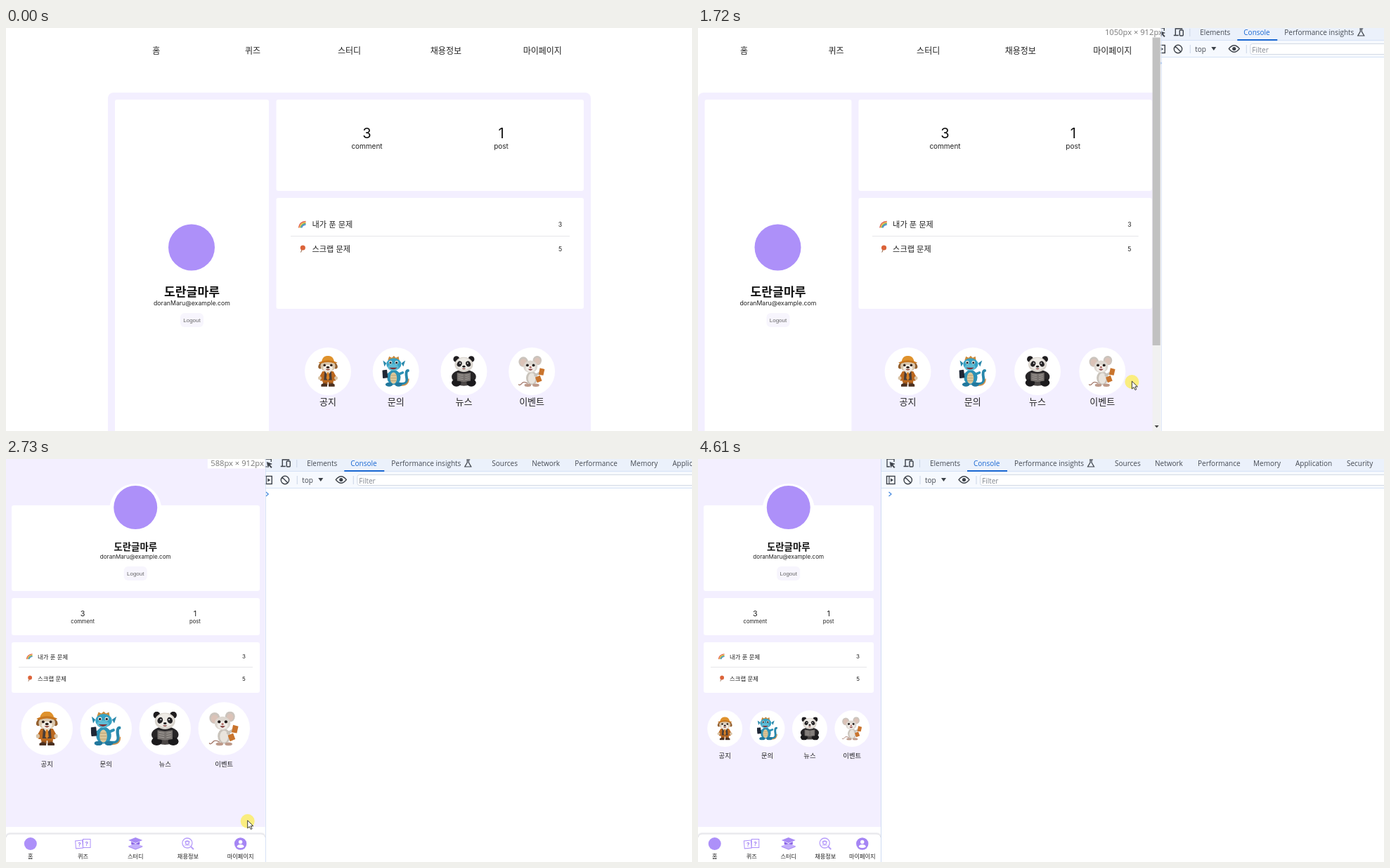
Write an HTML page that moves like this. It is 976 by 574 pixels and loops after 5.14 s.

```html
<!DOCTYPE html>
<html lang="ko">
<head>
<meta charset="utf-8">
<title>Responsive page</title>
<style>
html, body { margin: 0; width: 100%; height: 100%; overflow: hidden; background: #fff; }
svg { display: block; }
text { font-family: Inter, "Noto Sans CJK KR", "Noto Sans CJK", sans-serif; white-space: pre; }
.ui { font-family: "Open Sans", "Noto Sans", sans-serif; }
.btn { font-family: "Liberation Sans", Arial, sans-serif; }
</style>
</head>
<body>
<svg width="100%" height="100%" viewBox="0 0 976 574">
  <defs>
    <symbol id="pup" viewBox="0 0 40 46">
      <path d="M13 36h6.500v7h-7zM21 36h6.500l.5 7h-7z" fill="#9a561f"/>
      <path d="M10 42.500q5-3 9 0v3h-9zM21 42.500q5-3 9 0v3h-9z" fill="#4b3020"/>
      <path d="M12 23h16l5 9-2 5h-3v2H12v-2H9l-2-5z" fill="#bb681f"/>
      <path d="M15 23h10l1 13H14z" fill="#4a3d37"/>
      <path d="M15.500 23h9L20 29z" fill="#f1e8da"/>
      <path d="M18.700 24.500h2.600l1 9-2.300 3-2.300-3z" fill="#d98125"/>
      <ellipse cx="8" cy="33" rx="2.500" ry="2.800" fill="#d9c3a5"/>
      <ellipse cx="32" cy="33" rx="2.500" ry="2.800" fill="#d9c3a5"/>
      <ellipse cx="9" cy="15" rx="3" ry="4.500" fill="#94602f" transform="rotate(20 9 15)"/>
      <ellipse cx="31" cy="15" rx="3" ry="4.500" fill="#94602f" transform="rotate(-20 31 15)"/>
      <ellipse cx="20" cy="15.500" rx="11" ry="8.500" fill="#d9c7ae"/>
      <ellipse cx="20" cy="18.500" rx="7" ry="5" fill="#f4eee5"/>
      <path d="M10.500 9Q12 0 20 0t9.500 9z" fill="#df922c"/>
      <path d="M6 10Q20 3 34 10q-3 2-5 1-9-3-18 0-2 1-5-1z" fill="#c87720"/>
      <circle cx="15" cy="14" r="1.800" fill="#2a1c17"/><circle cx="25" cy="14" r="1.800" fill="#2a1c17"/>
      <ellipse cx="20" cy="17" rx="2.300" ry="1.600" fill="#2a1c17"/>
      <path d="M16.500 19.500q3.500 4 7 0z" fill="#8a3c31"/>
    </symbol>
    <symbol id="dragon" viewBox="0 0 40 46">
      <path d="M24 41Q38 44 36 33T38 22" fill="none" stroke="#2887aa" stroke-width="4" stroke-linecap="round"/>
      <path d="M28 44q11 0 11-10" fill="none" stroke="#d2904a" stroke-width="1.500"/>
      <path d="M8 7l2-6 4 2 3-3 3 3 4-2 1 6z" fill="#c98a3c"/>
      <ellipse cx="17" cy="32" rx="10" ry="11" fill="#2c91b5"/>
      <ellipse cx="16.500" cy="33" rx="5" ry="8.500" fill="#dcc79b"/>
      <path d="M12 29h9M12 33h9M12 37h9" stroke="#b99c6a" stroke-width=".8"/>
      <ellipse cx="10" cy="42.500" rx="5.500" ry="3" fill="#22789d"/>
      <ellipse cx="24" cy="42.500" rx="5.500" ry="3" fill="#22789d"/>
      <path d="M6 11l-5-4 2 9zM28 11l6-4-3 9z" fill="#2887aa"/>
      <ellipse cx="17" cy="12.500" rx="11" ry="9" fill="#37a2c4"/>
      <ellipse cx="16" cy="17" rx="8" ry="5" fill="#5fbcd5"/>
      <circle cx="12" cy="10" r="2.500" fill="#f3f1e8"/><circle cx="21" cy="10" r="2.500" fill="#f3f1e8"/>
      <circle cx="12" cy="10.300" r="1.600" fill="#1c2630"/><circle cx="21" cy="10.300" r="1.600" fill="#1c2630"/>
      <path d="M10 17.500q6 5.500 12 0z" fill="#7e3036"/>
      <path d="M10 27l-5 2M25 27l5-2" stroke="#2c91b5" stroke-width="3.800" stroke-linecap="round"/>
      <rect x="0" y="21" width="7.500" height="12" rx="1" fill="#1f2735" transform="rotate(-6 4 27)"/>
    </symbol>
    <symbol id="panda" viewBox="0 0 40 46">
      <circle cx="9" cy="5" r="4.600" fill="#1f1d1f"/><circle cx="31" cy="5" r="4.600" fill="#1f1d1f"/>
      <ellipse cx="20" cy="31" rx="18" ry="10.500" fill="#262426"/>
      <ellipse cx="20" cy="39" rx="12" ry="5.500" fill="#4b4746"/>
      <ellipse cx="9" cy="40" rx="7" ry="5.500" fill="#1b1a1c"/><ellipse cx="31" cy="40" rx="7" ry="5.500" fill="#1b1a1c"/>
      <ellipse cx="20" cy="13" rx="13.500" ry="11" fill="#d9d4cd"/>
      <ellipse cx="20" cy="12" rx="11" ry="9" fill="#eeebe6"/>
      <ellipse cx="13.500" cy="12" rx="3.500" ry="4.300" fill="#252325" transform="rotate(25 13.500 12)"/>
      <ellipse cx="26.500" cy="12" rx="3.500" ry="4.300" fill="#252325" transform="rotate(-25 26.500 12)"/>
      <circle cx="14.500" cy="11" r=".9" fill="#fff"/><circle cx="25.500" cy="11" r=".9" fill="#fff"/>
      <ellipse cx="20" cy="16" rx="2.200" ry="1.500" fill="#1f1d1f"/>
      <path d="M17 18.500q3 3.500 6 0z" fill="#8d4c49"/>
      <path d="M10 25l10 1.500L30 25v12l-10 1.500L10 37z" fill="#77726f"/>
      <path d="M12 28l7 1M12 31l7 1M12 34l7 1M22 29l6-1M22 32l6-1M22 35l6-1" stroke="#aaa5a1" stroke-width=".8"/>
    </symbol>
    <symbol id="mouse" viewBox="0 0 40 46">
      <path d="M14 41Q8 37 5 41T0 42" fill="none" stroke="#a47c6e" stroke-width="1.300"/>
      <ellipse cx="7.500" cy="9" rx="7" ry="7.500" fill="#cbc4bd"/><ellipse cx="7.500" cy="10" rx="4.800" ry="5.500" fill="#dbc3b8"/>
      <ellipse cx="28" cy="7" rx="6.500" ry="7" fill="#cbc4bd"/><ellipse cx="28" cy="8" rx="4.300" ry="5" fill="#dbc3b8"/>
      <ellipse cx="20" cy="33" rx="8.500" ry="10" fill="#c9c3bb"/><ellipse cx="20" cy="33.500" rx="5.500" ry="8" fill="#e9e4dd"/>
      <ellipse cx="14" cy="43.500" rx="5" ry="2.300" fill="#bd9a8a"/><ellipse cx="26" cy="43.500" rx="5" ry="2.300" fill="#bd9a8a"/>
      <ellipse cx="18" cy="16" rx="10.500" ry="9" fill="#ddd7d0"/>
      <ellipse cx="18" cy="18.500" rx="7" ry="5.500" fill="#f0ece7"/>
      <circle cx="13.500" cy="14" r="2" fill="#211b1a"/><circle cx="22.500" cy="14" r="2" fill="#211b1a"/>
      <circle cx="18" cy="17" r="1.500" fill="#b26f68"/>
      <path d="M14.500 19.500q3.500 4.500 7 0z" fill="#7f3736"/>
      <path d="M25 29l7-4" stroke="#c9c3bb" stroke-width="3.500" stroke-linecap="round"/>
      <path d="M32 18l7 2-2 9-7-1zM25 32l7-3 3 8-7 3z" fill="#c9742d"/>
    </symbol>
    <g id="rainbow" fill="none" stroke-width="1.500">
      <path d="M-5 4.500Q-4-4 5-4.500" stroke="#dd6250"/>
      <path d="M-3.600 4.500Q-2.500-2.500 5-3" stroke="#efb33e"/>
      <path d="M-2.200 4.500Q-1-1 5-1.500" stroke="#58ac76"/>
      <path d="M-.8 4.500Q0 .5 5 0" stroke="#4b87cf"/>
    </g>
    <g id="balloon">
      <path d="M0 0L-2 5" stroke="#8a5737"/><circle cx=".8" cy="-1.500" r="3.600" fill="#db6339"/>
    </g>
    <g id="icon0"><circle r="9" fill="#ad90f9"/></g>
    <g id="icon1" fill="#fff" stroke="#ad90f9">
      <rect x="-10.500" y="-5" width="10" height="11" transform="rotate(-5)"/>
      <rect x="0" y="-6.500" width="10.500" height="12"/>
      <g fill="#9c7bf2" stroke="none" font-size="8" font-weight="700" text-anchor="middle">
        <text x="-5" y="4">?</text><text x="5.300" y="2.500">?</text>
      </g>
    </g>
    <g id="icon2" fill="#a88af5">
      <path d="M-6-3v4q6 3 12 0v-4L0 0z" fill="#8d68e6"/><path d="M0-9L10-5 0-1-10-5z"/>
      <path d="M-10 3L0 0 10 3 0 7z" fill="#c3aefb"/><path d="M-10 3L0 7 10 3v1.500L0 8.500-10 4.500z"/>
    </g>
    <g id="icon3" fill="none" stroke="#b79dfa" stroke-width="1.300">
      <circle cx="-1" cy="-1" r="7"/><path d="M4 4l4 4" stroke-width="2"/>
      <circle cx="-1" cy="-1.500" r="2.500"/><path d="M-5-3h8M-5 2h8" stroke-width=".8"/>
    </g>
    <g id="icon4">
      <circle r="8.700" fill="#a585f4"/><circle cy="-2.500" r="2.700" fill="#fff"/>
      <path d="M-5 4.500q0-3.500 5-3.500t5 3.500q-5 3-10 0z" fill="#fff"/>
    </g>
    <g id="pointer">
      <circle cy="1" r="10" fill="#ffec1a" fill-opacity=".56"/>
      <path d="M0 0v11l2.600-2.400 2 4 1.800-.9-1.900-3.800H8z" fill="#fff" stroke="#222" stroke-width=".9"/>
    </g>
  </defs>
  <g id="stage"></g>
</svg>
<script>
const LOOP = 5140, WIDTH = 976, HEIGHT = 574;
const LILAC = '#f3efff', PURPLE = '#ad90f9';
const NAME = '도란글마루', MAIL = 'doranMaru@example.com';
const MENU = ['홈', '퀴즈', '스터디', '채용정보', '마이페이지'];
const FRIENDS = [['pup', '공지'], ['dragon', '문의'], ['panda', '뉴스'], ['mouse', '이벤트']];
const TASKS = [['rainbow', '내가 푼 문제', 3], ['balloon', '스크랩 문제', 5]];

const BURSTS = [[970, 1450, 8], [1520, 1990, 8], [2060, 2530, 8], [2590, 3020, 7], [3130, 3540, 7], [4270, 4610, 5]];
// time, divider, tools offset, page width, reported px, pointer x, pointer y
const KEYS = [
  [970, 992, 992, 977, 1560, 990, 494],
  [1100, 985, 965, 962, 1530, 940, 496],
  [1450, 839, 818, 823, 1323, 773, 500],
  [1900, 540, 530, 545, 870, 515, 505],
  [2060, 479, 478, 483, 768, 470, 506],
  [2463, 420, 400, 417, 664, 384, 510],
  [3020, 314.5, 314, 317, 508, 301, 520],
  [3540, 260, 260, 257.5, 412, 262, 526],
  [4185, 260, 260, 257.5, 412, 262, 526],
  [4525, 260, 260, 257.5, 412, 445, 549]
];

function snap(t) {
  let at = 0;
  for (const [from, to, steps] of BURSTS) {
    if (t < from) break;
    const step = (to - from) / (steps - 1);
    at = Math.min(to, from + Math.floor((t - from) / step + .06) * step);
  }
  return at;
}

function pose(t) {
  const next = KEYS.findIndex(k => k[0] > t);
  if (next === 0) return KEYS[0].slice(1);
  if (next < 0) return KEYS.at(-1).slice(1);
  const a = KEYS[next - 1], b = KEYS[next], f = (t - a[0]) / (b[0] - a[0]);
  return a.slice(1).map((v, i) => v + (b[i + 1] - v) * f);
}

const rect = (x, y, w, h, fill, rx = 0, extra = '') =>
  `<rect x="${x}" y="${y}" width="${Math.max(0, w)}" height="${h}" rx="${rx}" fill="${fill}" ${extra}/>`;
const circle = (x, y, r, fill) => `<circle cx="${x}" cy="${y}" r="${r}" fill="${fill}"/>`;
const text = (x, y, str, size, fill = '#222', extra = '', anchor = 'middle') =>
  `<text x="${x}" y="${y + size * .36}" font-size="${size}" fill="${fill}" text-anchor="${anchor}" ${extra}>${str}</text>`;
const ui = (x, y, str, fill = '#454a52', size = 10, anchor = 'start') => text(x, y, str, size, fill, 'class="ui"', anchor);
const line = (d, stroke, width = 1, fill = 'none') => `<path d="${d}" stroke="${stroke}" stroke-width="${width}" fill="${fill}"/>`;
const use = (id, x, y, scale = 1) => `<use href="#${id}" transform="translate(${x} ${y}) scale(${scale})"/>`;
const view = (x, w, body) => `<svg x="${x}" width="${Math.max(0, w)}" height="${HEIGHT}">${body}</svg>`;

function profile(x, nameY, nameSize, mailSize, gap) {
  const mailY = nameY + gap, y = mailY + 24;
  return text(x, nameY, NAME, nameSize, '#111', 'font-weight="700"') + text(x, mailY, MAIL, mailSize) +
    rect(x - 16.5, y - 10, 33, 20, '#f7f5fd', 6) + text(x, y, 'Logout', 8, '#666', 'class="btn"');
}

function friend(i, x, y, size, labelY, labelSize) {
  const [id, label] = FRIENDS[i], h = size * .67, w = h * 40 / 46;
  return `<ellipse cx="${x}" cy="${y}" rx="${size / 2}" ry="${size / 2 + 1}" fill="#fff"/>` +
    `<use href="#${id}" x="${x - w / 2}" y="${y - h / 2}" width="${w}" height="${h}"/>` +
    text(x, labelY, label, labelSize);
}

function desktop(page, divider) {
  const wide = Math.min(687, page), left = (page - wide) / 2, k = wide / 687;
  const x = r => left + r * k;
  let out = MENU.map((m, i) => text(x(68.7 + 137.4 * i), 33, m, 12)).join('');
  out += rect(left, 92, wide, 500, LILAC, 8) + rect(x(10), 102, 219 * k, 490, '#fff', 3);
  out += rect(x(239.5), 102, 437.5 * k, 130, '#fff', 3) + rect(x(239.5), 242, 437.5 * k, 158, '#fff', 3);
  out += circle(x(119), 312.5, 33, PURPLE) + profile(x(119.5), 376, 17.2, 8.75, 16);
  [[368.5, 3, 'comment'], [559.5, 1, 'post']].forEach(([r, n, label]) => {
    out += text(x(r), 150, n, 20, '#111') + text(x(r), 168, label, 10);
  });
  TASKS.forEach(([id, label, n], i) => {
    const y = 280 + 34.5 * i;
    out += use(id, x(276.5), y) + text(x(290.5), y, label, 11.2, '#222', '', 'start') + text(x(643.5), y, n, 8.7);
  });
  out += line(`M${x(260)} 296.5H${x(657)}`, '#e6e6ea');
  FRIENDS.forEach((_, i) => out += friend(i, x(313 + 96.7 * i), 489, 66, 532, 13));
  const bar = divider - 12;
  return out + rect(bar, 0, 12, HEIGHT, '#f1f1f1') + rect(bar, 0, 11, 452, '#c1c1c1') +
    `<path d="M${bar + 3} 566h6l-3 3.500z" fill="#444"/>`;
}

function mobile(page, divider) {
  const mid = page / 2, card = page - 15.5, tablet = page > 480 ? 1 : 0;
  const end = Math.max(page, divider);
  let out = rect(0, 0, end, 524, LILAC) + rect(8, 66, card, 122, '#fff', 3) +
    rect(8, 198, card, 53, '#fff', 3) + rect(8, 261 + tablet, card, 72, '#fff', 3);
  out += circle(mid, 72, 37, '#fff') + circle(mid, 69, 31, PURPLE) + profile(mid, 125, 13.4, 8.1, 14);
  [[page / 4 + 17, 3, 'comment'], [page * .75 - 7.5, 1, 'post']].forEach(([x, n, label]) => {
    out += text(x, 220, n, 10.8 + tablet * 1.2) + text(x, 231, label, 7.6);
  });
  TASKS.forEach(([id, label, n], i) => {
    const y = 281.5 + 31.2 * i + tablet * .7;
    out += use(id, 33.5, y, .8) + text(45, y, label, 8.4, '#222', '', 'start') + text(page - 30, y, n, 8);
  });
  out += line(`M18 ${296.5 + tablet}H${page - 17.5}`, '#e6e6ea');
  const gap = Math.min(84, (page - 16) / 4), size = gap - 10.5;
  FRIENDS.forEach((_, i) => out += friend(i, mid + (i - 1.5) * gap, 384 + tablet * .5, size, 397.5 + size / 2 + tablet * .5, 9.4));
  out += rect(0, 524, end, 50, '#fff') + line(`M0 538Q1 533 6 533H${end - 6}q5 0 6 5`, '#f0f0f3', 2) +
    line(`M0 539Q1 534 6 534H${end - 6}q5 0 6 5`, '#e0e0e5');
  MENU.forEach((label, i) => {
    const x = mid + (i - 2) * (page * .2 + 1);
    out += use('icon' + i, x, 548) + text(x, 566, label, 8.2);
  });
  return out;
}

const INK = '#3c4148', RULE = '#cbd5e6', BLUE = '#1967d2';
const TABS = [[70, 'Elements'], [132, 'Console'], [190, 'Performance insights'], [333, 'Sources'], [390, 'Network'],
  [451, 'Performance'], [530, 'Memory'], [590, 'Application'], [663, 'Security']];
const toolbar =
  line('M19 4V0H9V11h4M9 2v9', INK, 1.3) + line('M13 4.500l7 2.500-3 1.200 3 3.500-1 1-3.200-3.500-1.300 3z', INK, .6, INK) +
  line('M35 10V1h10M32.500 10.500h7', INK, 1.4) + rect(41, 3, 5, 8, 'none', 1, `stroke="${INK}" stroke-width="1.400"`) +
  line('M55.500 1V12M56 24V36M136 24V36', RULE) +
  TABS.map(([x, s]) => ui(x, 6.5, s, s === 'Console' ? BLUE : undefined)).join('') +
  rect(123, 16, 57, 2, BLUE) +
  line('M297 1h5M298 1v4l-3.500 6h9l-3.500-6v-4', INK, 1.2) +
  rect(8.5, 24.5, 11.5, 11, 'none', 0, `stroke="${INK}" stroke-width="1.400"`) + line('M12 24.500v11', INK, 1.2) +
  `<path d="M14 27.500l4 2.500-4 2.500z" fill="${INK}"/>` +
  line('M33 30a5.700 5.700 0 1 0 11.400 0a5.700 5.700 0 1 0-11.400 0M34.700 26l8 8', INK, 1.4) +
  ui(63, 30.5, 'top') + `<path d="M86 27h7l-3.500 5z" fill="${INK}"/>` +
  line('M111 29.500q7.500-9.500 15 0q-7.500 9.500-15 0z', INK, 1.3) + circle(118.5, 29.5, 2.6, INK) +
  rect(141.5, 22.5, 900, 15, '#fff', 3, 'stroke="#d3d9e4"') + ui(144, 31, 'Filter', '#80868f');
const issues = ui(49, 53, 'Issues:', undefined, 10, 'end') +
  `<path d="M56 48h9v7h-6l-3 2.500z" fill="${BLUE}"/>` + line('M58 50.500h5M58 52.700h4', '#fff', .8) + ui(68, 53, '5') +
  line('M83.500 46V59', RULE) + `<circle cx="99" cy="52" r="5.300" fill="none" stroke="${INK}" stroke-width="2.200" stroke-dasharray="2.800 1.363"/>` +
  `<circle cx="99" cy="52" r="4.300" fill="none" stroke="${INK}" stroke-width="1.300"/>` + circle(99, 52, 1.8, INK);

function tools(divider, offset, caret) {
  const narrow = offset > 750, bottom = narrow ? 63.5 : 41.5, y = bottom + 8.5;
  const prompt = line(`M11.500 ${y - 3}l3.500 3-3.500 3`, '#4c8de0', 1.3) +
    (caret ? rect(22.5, y - 4, 1, 11, '#222') : '');
  return rect(0, 0, WIDTH, HEIGHT, '#fff') + rect(0, 0, WIDTH, 18, '#ebf1fb') +
    rect(0, 18, WIDTH, bottom - 18, '#f6f9fe') + line(`M0 17.500H${WIDTH}M0 ${bottom}H${WIDTH}`, '#d5e2f6') +
    `<g transform="translate(${offset - divider})">${toolbar}${narrow ? issues : ''}${prompt}</g>` +
    line(`M.5 0V${HEIGHT}`, '#cfdcf3');
}

function sizeLabel(px) {
  const end = px * .6372 - 8, w = px >= 1000 ? 86 : 80;
  return rect(end - w, 0, w + 6, 13.5, '#fff') + ui(end, 5.5, `${Math.round(px)}px × 912px`, '#777', 11.2, 'end');
}

function render(t) {
  const now = snap(t), [divider, offset, page, px, x, y] = pose(now);
  const caret = now > 0 && t < 4900 && t % 1000 < 440;
  const label = now >= 970 && now < 4520 ? sizeLabel(px) : '';
  const layout = px > 1024 ? desktop : mobile;
  return view(0, Math.min(divider, WIDTH), layout(page, divider) + label) +
    view(divider, WIDTH - divider, tools(divider, offset, caret)) +
    (now >= 970 && now < 4600 ? use('pointer', x, y) : '');
}

const stage = document.getElementById('stage');
let shown = '';
function tick() {
  const markup = render(performance.now() % LOOP);
  if (markup !== shown) stage.innerHTML = shown = markup;
  requestAnimationFrame(tick);
}
tick();
</script>
</body>
</html>
```
